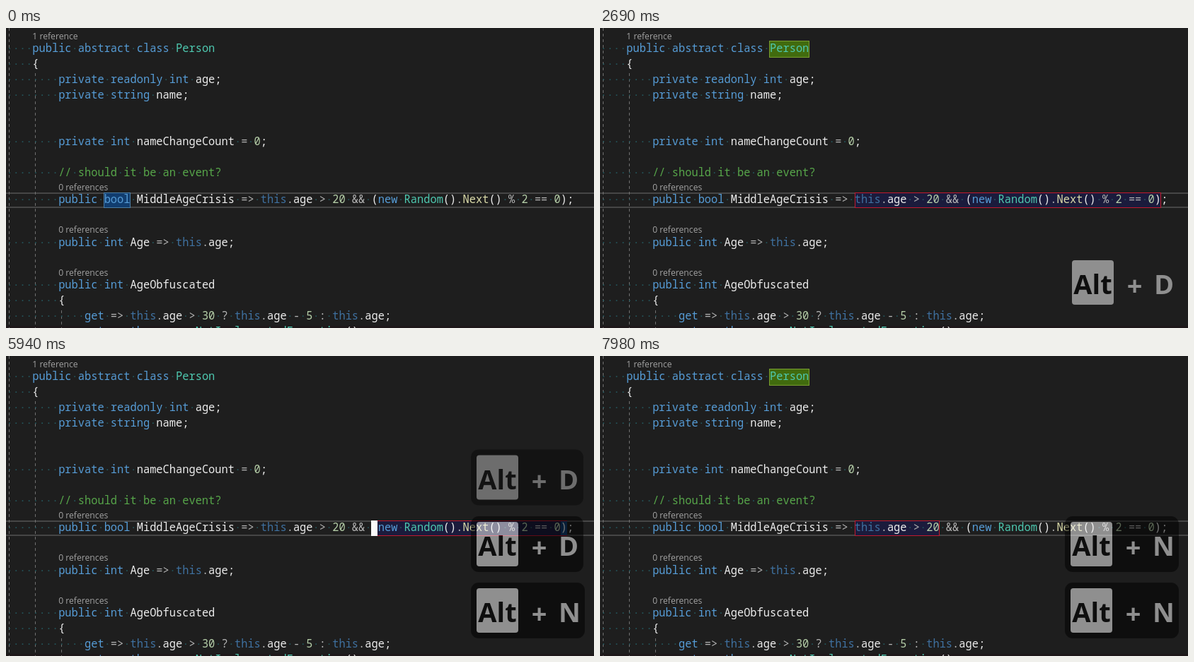
Recreate the animation shown at these times as an HTML page with a canvas. Size 831 by 425 pixels, loop 8 s.

```html
<!DOCTYPE html>
<html lang="en">
<head>
<meta charset="utf-8">
<title>Selecting expressions in a code editor</title>
<style>
  html, body { margin: 0; width: 100%; height: 100%; overflow: hidden; background: #1e1e1e; }
  canvas { display: block; }
</style>
</head>
<body>
<canvas id="stage" width="831" height="425"></canvas>
<script>
const LOOP = 8000, W = 831, H = 425;
const CODE = '500 15.36px "Noto Sans Mono", monospace';
const LENS = '12.2px "Open Sans", sans-serif';
const KEYS = 'bold 38px "Open Sans", sans-serif';
const CHAR = 9.216, LEFT = 0.4;
const ROW = 233, ROW_H = 22;

const color = {
  keyword: '#569cd6', faded: '#3f71a0', type: '#4ec9b0', method: '#dcdcaa',
  number: '#b5cea8', comment: '#57a64a', operator: '#b4b4b4', plain: '#ececec'
};

// [baseline, indent, text]
const lines = [
  [34, 4, 'public abstract class Person'],
  [56, 4, '{'],
  [78, 8, 'private readonly int age;'],
  [100, 8, 'private string name;'],
  [166, 8, 'private int nameChangeCount = 0;'],
  [210, 8, '// should it be an event?'],
  [248, 8, 'public bool MiddleAgeCrisis => this.age > 20 && (new Random().Next() % 2 == 0);'],
  [309, 8, 'public int Age => this.age;'],
  [369, 8, 'public int AgeObfuscated'],
  [391, 8, '{'],
  [413, 12, 'get => this.age > 30 ? this.age - 5 : this.age;'],
  [435, 12, 'set => throw new NotImplementedException();']
];
const lenses = [[16, 4, '1 reference'], [230, 8, '0 references'],
                [290, 8, '0 references'], [351, 8, '0 references']];

const kinds = [
  [/^\/\//, 'comment'],
  [/^this$/, 'faded'],
  [/^(public|private|abstract|class|readonly|int|string|bool|new|get|set|throw)$/, 'keyword'],
  [/^(Person|Random|NotImplementedException)$/, 'type'],
  [/^Next$/, 'method'],
  [/^\d/, 'number'],
  [/^[=>&%?:.\-]+$/, 'operator']
];

const stage = document.getElementById('stage');
const ctx = stage.getContext('2d');
const colX = col => LEFT + col * CHAR;

function makeLayer() {
  const c = document.createElement('canvas');
  c.width = W;
  c.height = H;
  return c.getContext('2d');
}
const layer = makeLayer();

function rect(x, y, w, h, fill) {
  ctx.fillStyle = fill;
  ctx.fillRect(x, y, w, h);
}

function frameBox(x, y, w, h, fill, line) {
  rect(x, y, w, h, line);
  rect(x + 1, y + 1, w - 2, h - 2, fill);
}

function drawGuide(x, top) {
  ctx.strokeStyle = '#707070';
  ctx.lineWidth = 1;
  ctx.setLineDash([4, 4]);
  ctx.beginPath();
  ctx.moveTo(x, top);
  ctx.lineTo(x, H);
  ctx.stroke();
  ctx.setLineDash([]);
}

function drawLine([y, indent, text]) {
  const full = ' '.repeat(indent) + text;
  for (let i = 0; i < full.length; i++) {
    if (full[i] === ' ') rect(colX(i) + 3.8, y - 5.7, 1.7, 1.7, '#24565c');
  }
  ctx.font = CODE;
  for (const m of text.matchAll(/\/\/.*|\w+|[=>&%?:.\-]+|[^\s\w]/g)) {
    const kind = kinds.find(([rule]) => rule.test(m[0]));
    ctx.fillStyle = color[kind ? kind[1] : 'plain'];
    ctx.fillText(m[0], colX(indent + m.index), y);
  }
}

function drawSelection(from, to) {
  const x = Math.round(colX(from)), w = Math.round(colX(to)) - x;
  frameBox(x, ROW, w, ROW_H, '#1b1b3c', '#c01a30');
}

function drawBulb(x, y) {
  ctx.fillStyle = '#f0c53c';
  ctx.beginPath();
  ctx.arc(x + 7, y + 6, 5, 0, Math.PI * 2);
  ctx.fill();
  rect(x + 5, y + 12, 4, 3, '#c8c8c8');
  ctx.beginPath();
  ctx.moveTo(x + 15, y + 6);
  ctx.lineTo(x + 21, y + 6);
  ctx.lineTo(x + 18, y + 9);
  ctx.fill();
}

// Opaque on its own layer, then blended as a group
function drawKeys(letter, top, { shift = 0, panel = true, alpha = 1 } = {}) {
  const x = 665 + shift;
  layer.clearRect(0, 0, W, H);
  const box = (l, t, w, h, r, fill) => {
    layer.fillStyle = fill;
    layer.beginPath();
    layer.roundRect(l, t, w, h, r);
    layer.fill();
  };
  if (panel) box(x - 8, top - 8, letter === 'N' ? 161 : 159, 79, 11, '#000');
  box(x, top, 59, 63, 4, '#fff');
  layer.font = KEYS;
  layer.textAlign = 'center';
  layer.fillStyle = '#000';
  layer.fillText('Alt', x + 29.5, top + 48);
  layer.fillStyle = '#fff';
  layer.fillText('+', x + 88.5, top + 50);
  layer.textAlign = 'left';
  layer.fillText(letter, x + 116, top + 48);
  ctx.globalAlpha = 0.5 * alpha;
  ctx.drawImage(layer.canvas, 0, 0);
  ctx.globalAlpha = 1;
}

function drawOverlay(t) {
  const [top, mid, low] = [140.5, 235, 329];
  if (t < 1130) return;
  if (t < 4860) {
    if (t >= 2940) drawKeys('D', mid, { shift: 2 });
    drawKeys('D', low, { shift: 2, panel: false });
  } else if (t < 7160) {
    if (t < 6090) drawKeys('D', top, { alpha: t < 5940 ? 1 : 0.7 });
    drawKeys('D', mid);
    drawKeys('N', low);
  } else {
    if (t < 7980) drawKeys('D', top);
    drawKeys('N', mid);
    drawKeys('N', low);
  }
}

// Each entry flips the caret between hidden and shown
const blinks = [150, 740, 1010, 1570, 2130, 2690, 3090, 3620, 4180, 4740,
                4860, 5410, 5940, 6490, 7040, 7580];

function drawCaret(t) {
  if (blinks.filter(b => b <= t).length % 2 === 0) return;
  const col = t < 1010 ? 17 : t >= 4860 && t < 7040 ? 56 : 39;
  rect(Math.round(colX(col)), ROW, 9, ROW_H, '#fafafa');
}

function draw(t) {
  rect(0, 0, W, H, '#1e1e1e');
  rect(0, 422, W, 3, '#1e181a');
  rect(0, ROW, W, 2, '#464646');
  rect(0, ROW + ROW_H - 2, W, 2, '#464646');
  drawGuide(4.5, 0);
  drawGuide(41.5, 64);
  drawGuide(78.5, 400);

  if (t < 1010) frameBox(138, ROW, 38, ROW_H, '#113d6f', '#4a7da6');
  else if (t < 2940) drawSelection(39, 86);
  else if (t < 4860 || t >= 7040) drawSelection(39, 52);
  else drawSelection(56, 86);

  if (t >= 5010 && t < 7310) {
    for (const col of [56, 85]) rect(Math.round(colX(col)), ROW + 1, 9, ROW_H - 2, '#113d6f');
  }
  if ((t >= 1410 && t < 4860) || t >= 7430) frameBox(239, 18, 57, 24, '#416b0e', '#7a9e2f');

  lines.forEach(drawLine);
  ctx.font = LENS;
  ctx.fillStyle = '#a2a2a2';
  for (const [y, indent, text] of lenses) ctx.fillText(text, colX(indent), y);

  if (t >= 860 && t < 1010) drawBulb(111, 199);
  drawCaret(t);
  drawOverlay(t);
}

const start = performance.now();
function tick() {
  draw((performance.now() - start) % LOOP);
  requestAnimationFrame(tick);
}
tick();
</script>
</body>
</html>
```
